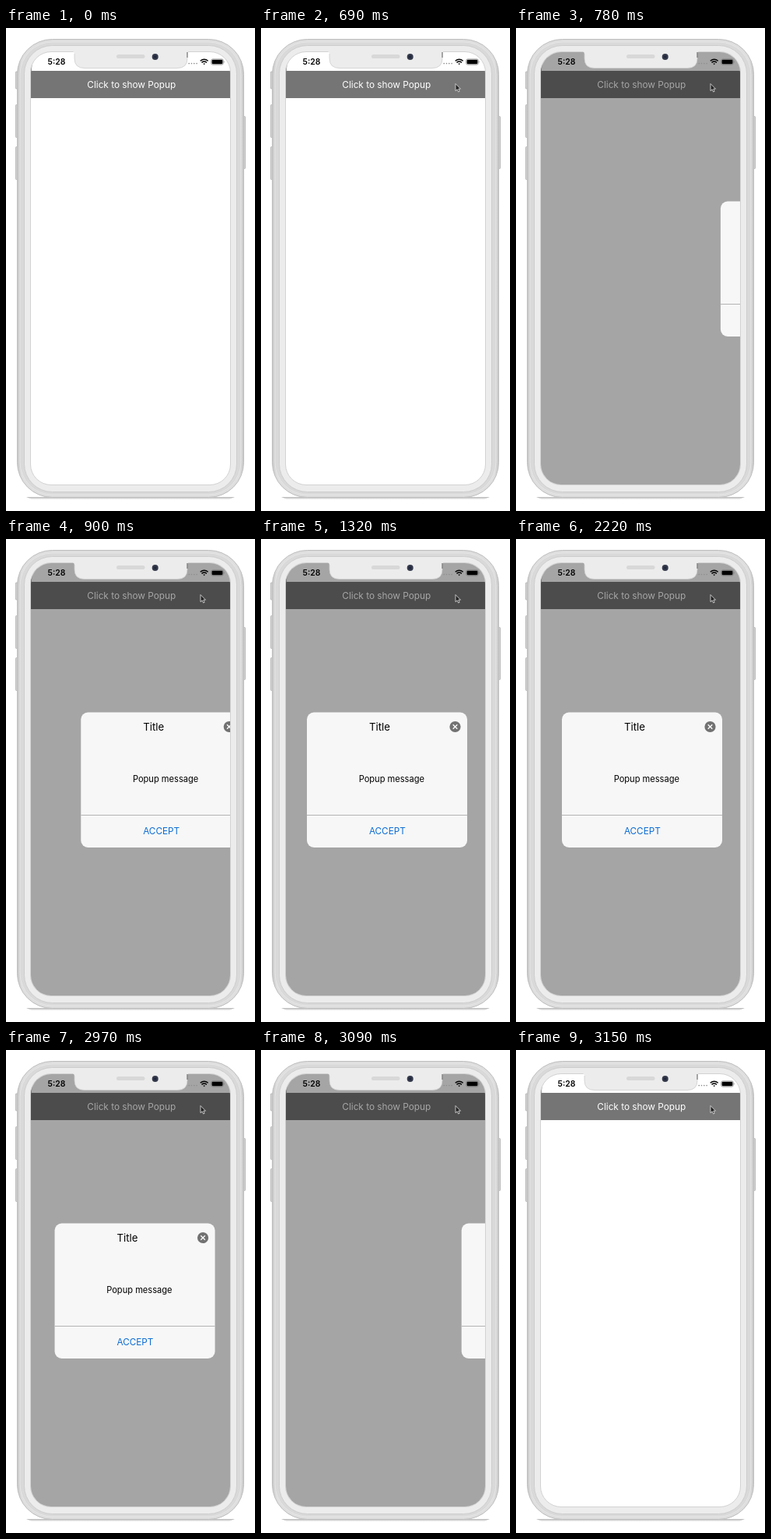
Write an HTML page that moves like this. It is 320x620 px and loops after 3810 ms.

```html
<!DOCTYPE html>
<html lang="en">
<head>
<meta charset="utf-8">
<title>Popup slide-in</title>
<style>
  html, body { margin: 0; width: 100%; height: 100%; overflow: hidden; background: #fff; }
  svg { display: block; width: 320px; height: 620px; }
  text { font-family: Inter, "Liberation Sans", sans-serif; text-anchor: middle; }
</style>
</head>
<body>
<svg viewBox="0 0 320 620">
  <defs>
    <clipPath id="screen"><rect x="32" y="31" width="256" height="555" rx="26"/></clipPath>
    <linearGradient id="ground" x2="0" y2="1">
      <stop stop-color="#b4b4b4"/>
      <stop offset="1" stop-color="#fff"/>
    </linearGradient>
    <linearGradient id="rim">
      <stop stop-color="#c9c9c9"/>
      <stop offset=".02" stop-color="#dedede"/>
      <stop offset=".98" stop-color="#dedede"/>
      <stop offset="1" stop-color="#c9c9c9"/>
    </linearGradient>
  </defs>

  <!-- Phone body -->
  <path d="M26 602H294L286 605.5H34Z" fill="url(#ground)"/>
  <g fill="#d2d2d2" stroke="#a9a9a9" stroke-width=".7">
    <rect x="12.4" y="56" width="3" height="22" rx="1"/>
    <rect x="12.4" y="98.500" width="3" height="42" rx="1"/>
    <rect x="12.4" y="152.500" width="3" height="42" rx="1"/>
    <rect x="304.600" y="113.500" width="3" height="67" rx="1"/>
  </g>
  <rect x="14.500" y="14.500" width="291" height="588" rx="45" fill="url(#rim)" stroke="#bdbdbd"/>
  <rect x="18" y="18" width="284" height="581" rx="41.500" fill="#d9d9d9" stroke="#e6e6e6"/>
  <rect x="23.500" y="22.500" width="273" height="573" rx="36" fill="#ececec" stroke="#c8c8c8" stroke-width=".8"/>
  <rect x="31.500" y="30.500" width="257" height="556" rx="26.500" fill="#fff" stroke="#d2d2d2"/>

  <g clip-path="url(#screen)">
    <path d="M32.400 55C32.600 44 35.500 36 43 31.500" fill="none" stroke="#555" stroke-width=".8"/>
    <rect x="32" y="55" width="256" height="35" fill="#757575"/>
    <text x="161.300" y="77" font-size="11.800" fill="#fff">Click to show Popup</text>
    <g id="dim" visibility="hidden">
      <rect x="32" y="31" width="256" height="555" fill="#000" fill-opacity=".353"/>
    </g>

    <!-- Status bar -->
    <text x="65" y="47" font-size="10.400" font-weight="600">5:28</text>
    <path d="M235.200 45.500H246" stroke="#8f8f8f" stroke-width="1.700" stroke-linecap="round" stroke-dasharray="0 3.300"/>
    <g fill="none" stroke="#000" stroke-width="1.500">
      <path d="M249.700 42.300Q254.700 38.100 259.700 42.300M251.500 44.300Q254.700 41.700 257.900 44.300"/>
      <path d="M253.200 45.500H256.200L254.700 47.200Z" fill="#000" stroke="none"/>
      <rect x="263.700" y="39.900" width="15.600" height="7.200" rx="2" stroke="#777" stroke-width=".7"/>
    </g>
    <rect x="264.600" y="40.800" width="13.800" height="5.400" rx="1.100"/>
    <path d="M280.200 42.300Q281.500 43.500 280.200 44.700Z" fill="#777"/>

    <g id="popup" visibility="hidden">
      <rect x="59" y="222.500" width="206" height="173.500" rx="9" fill="#f7f7f7"/>
      <path d="M59 354.500H265" stroke="#b4b4b4"/>
      <text x="152.500" y="246" font-size="13.200">Title</text>
      <text x="167.800" y="312" font-size="11.100">Popup message</text>
      <text x="162.300" y="379.300" font-size="11.700" fill="#0b6cd4">ACCEPT</text>
      <circle cx="249.500" cy="241" r="7.100" fill="#727272"/>
      <path d="M246.700 238.200L252.300 243.800M252.300 238.200L246.700 243.800" stroke="#fff" stroke-width="1.300"/>
    </g>

    <path id="cursor" visibility="hidden" d="M0 0V9.200L2.100 7.300L3.500 10.500L5.100 9.800L3.700 6.700H6.500Z"
      fill="#222" stroke="#e6e6e6" stroke-width=".8"/>
  </g>

  <!-- Notch -->
  <path d="M86 30H234.500Q233 31 233 34V39Q233 51.500 220 51.500H101Q88 51.500 88 39V34Q88 31 86 30Z" fill="#ececec"/>
  <path d="M233 31V39Q233 51.500 220 51.500H101Q88 51.500 88 39V33" fill="none" stroke="#cfcfcf" stroke-width=".8"/>
  <path d="M233 31V38" stroke="#555" stroke-width=".9"/>
  <rect x="142" y="34" width="36.500" height="5" rx="2.500" fill="#d8d8d8"/>
  <circle cx="191.700" cy="37" r="4" fill="#343a4b"/>
  <circle cx="191.700" cy="37" r="1.800" fill="#20263d"/>
</svg>

<script>
  const LOOP = 3810, STEP = 30;
  const TRAVEL = 256;
  const cursorMove = { shown: 480, start: 450, end: 690, from: [292, 104], to: [250, 71.5] };
  const enter = { shown: 780, start: 750, end: 980 };
  const leave = { start: 2953, end: 3113, hidden: 3150 };

  const [dim, popup, cursor] = ["dim", "popup", "cursor"].map(id => document.getElementById(id));
  const progress = (t, { start, end }) => Math.min(1, Math.max(0, (t - start) / (end - start)));
  const sineOut = p => Math.sin(p * Math.PI / 2);
  const sineIn = p => 1 - Math.cos(p * Math.PI / 2);
  const show = (node, on) => node.setAttribute("visibility", on ? "visible" : "hidden");
  const move = (node, x, y) => node.setAttribute("transform", `translate(${x} ${y})`);

  function render(time) {
    const t = Math.floor((time % LOOP) / STEP) * STEP;
    const open = t >= enter.shown && t < leave.hidden;
    show(dim, open);
    show(popup, open);
    const offset = 1 - sineOut(progress(t, enter)) + sineIn(progress(t, leave));
    move(popup, TRAVEL * offset, 0);

    show(cursor, t >= cursorMove.shown);
    const p = sineOut(progress(t, cursorMove));
    const [x, y] = cursorMove.from.map((a, i) => a + (cursorMove.to[i] - a) * p);
    move(cursor, x, y);
  }

  const begin = performance.now();
  function tick() {
    render(performance.now() - begin);
    requestAnimationFrame(tick);
  }
  tick();
</script>
</body>
</html>
```
